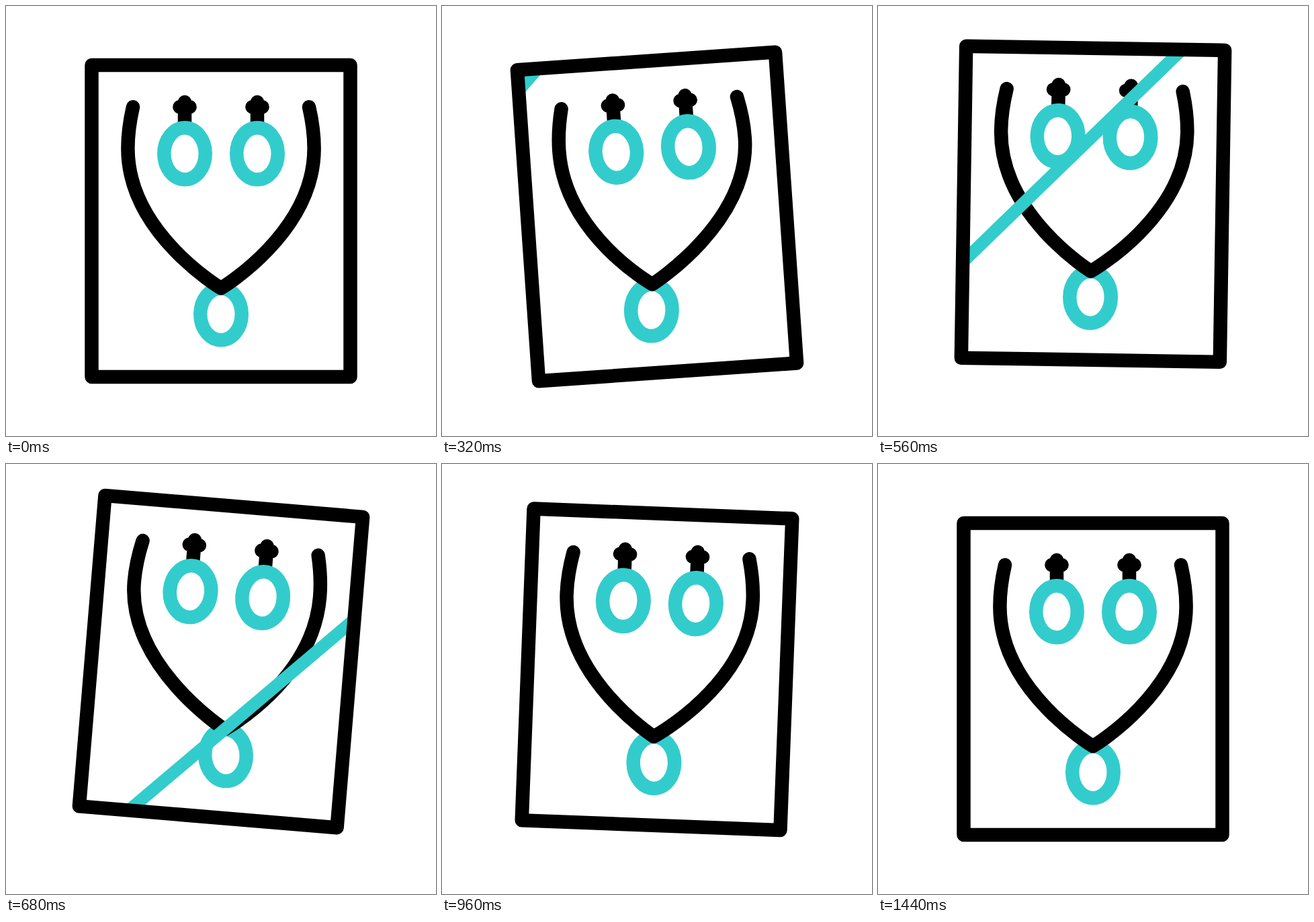
These frames come from a looping animation (640 by 640 pixels, 1520 ms). An HTML page:

```html
<!DOCTYPE html>
<html lang="en">
<head>
<meta charset="utf-8">
<title>Jewellery set</title>
<style>
  html, body { margin: 0; height: 100%; overflow: hidden; background: #fff; }
  svg { display: block; width: 100vw; height: 100vh; }
  g { fill: none; stroke: #000; stroke-width: 20.5; stroke-linecap: round; stroke-linejoin: round; }
  .teal { stroke: #3cc; }
</style>
</head>
<body>
<svg viewBox="0 0 640 640">
  <defs>
    <clipPath id="inside"><rect x="-192" y="-232" width="384" height="464"/></clipPath>
    <g id="earring">
      <path d="M-7.6-169.7H7.6M0-177V-140"/>
      <ellipse class="teal" cy="-100.2" rx="30.75" ry="38.5"/>
    </g>
  </defs>
  <!-- coordinates are relative to the middle of the card -->
  <g id="card">
    <use href="#earring" x="-54"/>
    <use href="#earring" x="54"/>
    <ellipse id="pendant" class="teal" cy="38.7" rx="30.75" ry="38.5"/>
    <path id="chain"/>
    <g clip-path="url(#inside)">
      <path id="shine" class="teal" d="M-500 500L500-500" style="stroke-width:18.5"/>
    </g>
    <rect x="-192.5" y="-232" width="385" height="464"/>
  </g>
</svg>
<script>
const LOOP = 1520, STEP = 40;
const $ = id => document.getElementById(id);

// Symmetric ease in and out; a higher power lingers longer at both ends.
const ease = (u, power) => u ** power / (u ** power + (1 - u) ** power);

// Chains eased moves: each [from, to, change] adds its change over that time span.
const track = (power, ...moves) => t => moves.reduce((sum, [from, to, change]) =>
  sum + change * ease(Math.min(1, Math.max(0, (t - from) / (to - from))), power), 0);

const lift = track(2, [138, 632, -25.9], [695, 1252, 25.9]);
const tilt = track(2, [40, 372, -4.1], [372, 730, 9.1], [730, 1164, -5]);
const sway = track(3, [40, 385, -14.1], [385, 750, 28.2], [750, 1130, -23.1], [1130, 1440, 9]);
const swing = track(3, [40, 385, 5.7], [385, 750, -13], [750, 1130, 7.3]);
const sweep = track(2, [138, 1096, 440]);

function draw(ms) {
  const t = Math.floor(ms % LOOP / STEP) * STEP;
  const tip = sway(t), shift = sweep(t) - 220;
  $('card').setAttribute('transform', `translate(320 ${320 + lift(t)}) rotate(${tilt(t)})`);
  $('chain').setAttribute('d', `M-131-169.7C-136-148-138.6-127-138.6-108C-138.6 18 ${tip} 100 ${tip} 100`
    + `C${tip} 100 138.6 18 138.6-108C138.6-127 136-148 131-169.7`);
  $('pendant').setAttribute('transform', `translate(${tip} 100) rotate(${swing(t)})`);
  $('shine').setAttribute('transform', `translate(${shift} ${shift})`);
}

const start = performance.now();
function tick() {
  draw(performance.now() - start);
  requestAnimationFrame(tick);
}
tick();
</script>
</body>
</html>
```
